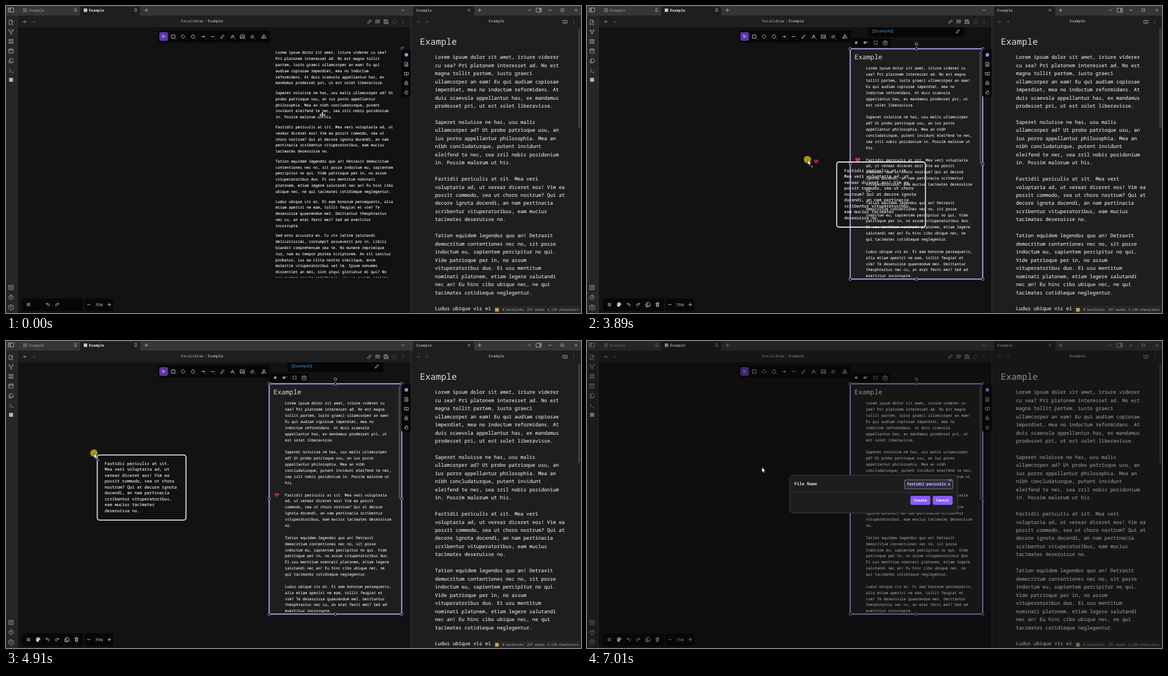
Write an HTML page that moves like this. It is 1024 px wide and 547 px high and loops after 8000 ms.

```html
<!DOCTYPE html>
<html lang="en">
<head>
<meta charset="utf-8">
<title>Drag a paragraph onto the canvas</title>
<style>
  html, body { margin: 0; width: 100%; height: 100%; overflow: hidden; background: #121212; }
  svg { display: block; width: 100vw; height: 100vh; }
  text { font-family: "Noto Sans Mono", "DejaVu Sans Mono", monospace; font-weight: 500; text-rendering: geometricPrecision; white-space: pre; }
  text.sans { font-family: "Open Sans", "Noto Sans", sans-serif; }
  .prose text { stroke: currentColor; stroke-width: .16px; }
  .icon { fill: none; stroke-width: .9; stroke-linecap: round; stroke-linejoin: round; }
</style>
</head>
<body>
<svg id="stage" viewBox="0 0 1024 547" preserveAspectRatio="none"></svg>
<script>
const LOOP = 8000;

const paragraphs = [
  "Lorem ipsum dolor sit amet, iriure viderer cu sea? Pri platonem interesset ad. No est magna tollit partem, iusto graeci ullamcorper an eam! Eu qui audiam copiosae imperdiet, mea no indoctum reformidans. At duis scaevola appellantur has, ex mandamus prodesset pri, ut est solet liberavisse.",
  "Saperet noluisse ne has, usu malis ullamcorper ad? Ut probo patrioque usu, an ius porro appellantur philosophia. Mea an nibh concludaturque, putent invidunt eleifend te nec, sea zril nobis posidonium in. Possim malorum ut his.",
  "Fastidii periculis at sit. Mea veri voluptaria ad, ut verear diceret eos! Vim ea possit commodo, sea ut choro nostrum? Qui at decore ignota docendi, an nam pertinacia scribentur vituperatoribus, eam mucius tacimates deseruisse no.",
  "Tation equidem legendos quo an! Detraxit democritum contentiones nec no, sit posse indoctum eu, sapientem percipitur no qui. Vide patrioque per in, no assum vituperatoribus duo. Ei usu mentitum nominati platonem, etiam legere salutandi nec an! Eu hinc cibo ubique nec, ne qui tacimates cotidieque neglegentur.",
  "Ludus ubique vis ei. Ei eam bonorum persequeris, alia etiam aperiri ne eam, tollit feugiat et vim? Te deseruisse quaerendum mel. Omittantur theophrastus nec cu, an erat ferri mei? Sed ad evertitur incorrupte.",
  "Sed eros accusata ex. Cu vix latine salutandi delicatissimi, corrumpit assueverit pro in. Libris blandit comprehensam sea te. No munere reprimique ius, nam eu tempor postea scriptorem. An sit sanctus probatus, ius ea clita nostro similique, enim molestie vituperatoribus vel te. Ipsum nonumes dissentiet an mei, sint atqui gloriatur ei qui? No per partem populo cotidieque, usu ea quando scripta"
];

const shapes = {
  sidebar: "M-4.5-3.5h9v7h-9zM-1.5-3.5v7M-3.5-1.5h1M-3.5 0h1",
  panel: "M-4.5-3.5h9v7h-9zM1.5-3.5v7M2.5-1.5h1M2.5 0h1",
  file: "M-3-4h4l2 2v6h-6zM1-4v2h2M-1.5 1h3M0-.5v3",
  search: "M-3.5 4v-8h4l2.5 2.5v2M.5-4v2.5h2.5M-3.5 4h2M1 1a1.7 1.7 0 1 0 .1 0M2.3 4l1.2 1",
  fork: "M-3-4a1.2 1.2 0 1 0 .1 0M3-4a1.2 1.2 0 1 0 .1 0M0 2a1.2 1.2 0 1 0 .1 0M-3-1.6q0 2 3 2v1.6M3-1.6q0 2-3 2",
  grid: "M-3.5-3.5h2.5v2.5h-2.5zM1-3.5h2.5v2.5h-2.5zM-3.5 1h2.5v2.5h-2.5zM1 1h2.5v2.5h-2.5z",
  calendar: "M-3.7-3h7.4v6.8h-7.4zM-3.7-.8h7.4M-1.8-4.2v2M1.8-4.2v2",
  copy: "M-1.2-3.8h3l2 2v4.6h-5zM-1.2-1.2h-2.5v5h5v-1",
  prompt: "M-3.5-3l3 3-3 3M.5 3h3.5",
  vault: "M-3.7-3.7h7.4v7.4h-7.4zM0-2a1.6 1.6 0 1 0 .1 0M0 1.2v1",
  help: "M0-4a4 4 0 1 0 .1 0M-1.2-1.2q.2-1.3 1.3-1.2 1.2.2 1 1.3-.3.9-1.1 1.2v.5M0 2v.2",
  gear: "M-1-4h2l.5 1.3 1.3.7 1.4-.3 1 1.7-1 1 0 1 1 1-1 1.6-1.4-.3-1.3.8-.5 1.2h-2l-.5-1.2-1.2-.8-1.4.3-1-1.6 1-1v-1l-1-1 1-1.7 1.4.3 1.2-.7zM0-1.3a1.5 1.5 0 1 0 .1 0",
  pin: "M-1.5-3.7h3v3l1.3 2h-5.6l1.3-2zM0 1.3v2.7",
  plus: "M-3 0h6M0-3v6", minus: "M-2.5 0h5", close: "M-2-2l4 4M2-2l-4 4",
  down: "M-2.5-1.2l2.5 2.5 2.5-2.5",
  left: "M2.7 0h-5.4l2-2M-2.7 0l2 2", right: "M-2.7 0h5.4l-2-2M2.7 0l-2 2",
  link: "M-.5-1.5l1.5-1.5q1.2-.9 2.2.2t0 2l-1.5 1.5q-1.1.9-2.2 0M.5 1.5l-1.5 1.5q-1.2.9-2.2-.2t0-2l1.5-1.5q1.1-.9 2.2 0",
  quote: "M-3.5-3h2.5v3q0 2.5-2.5 3v-6M1-3h2.5v3q0 2.5-2.5 3v-6",
  save: "M-3.5-3.5h5.5l1.5 1.5v5.5h-7zM-2-3.5v2h3v-2M-2 3.5v-3h4v3",
  circle: "M0-3.4a3.4 3.4 0 1 0 .1 0", dots: "M0-2.7v.2M0 0v.2M0 2.7v.2",
  book: "M0-2v5.2q-1.8-1-4-.6v-5.2q2.5-.3 4 .6 1.5-.9 4-.6v5.2q-2.2-.4-4 .6",
  square: "M-2.2-2.2h4.4v4.4h-4.4z", box: "M-3.2-3.2h6.4v6.4h-6.4z",
  pointer: "M-2.5-2.5l2 5.2 1-2.2 2.2-1z", diamond: "M0-3.7l3.7 3.7-3.7 3.7-3.7-3.7z",
  line: "M-3 0h6", pencil: "M-3.2 3.2l.6-2.2 4.3-4.2 1.6 1.6-4.2 4.3z",
  letter: "M-3 3l2.6-6h.8l2.6 6M-1.9.8h3.8", image: "M-3.7-3h7.4v6h-7.4zM-3.5 2l2.5-2.5 2 1.8 1-1 1.7 1.5M1.5-1.5v.2",
  eraser: "M-3.4.8l4-4 2.8 2.8-3.2 3.4h-1.6zM-1.5-1.2l2.8 2.8",
  trio: "M0-3.7l1.6 2.7h-3.2zM-3.5.8h2.6v2.6h-2.6zM2.3.7a1.4 1.4 0 1 0 .1 0",
  lock: "M-2.8-.5h5.6v4h-5.6zM-1.8-.5v-1.3q.2-2 1.9-2 1.4 0 1.7 1.3M0 1v1",
  hand: "M-2 .8v-3q.7-1 1.2 0v-1q.8-.9 1.3 0v1q.7-.8 1.3 0v1.2q.9-.7 1.3.2v2q-.3 2.5-2.7 2.6-1.8 0-2.5-1.3l-1.4-2.5q.5-.8 1.5.8",
  menu: "M-2.7-2h5.4M-2.7 0h5.4M-2.7 2h5.4",
  undo: "M-1.2-3l-1.8 1.8 1.8 1.8M-3-1.2h4q2 .2 2 1.8t-2 1.8h-.8", redo: "M1.2-3l1.8 1.8-1.8 1.8M3-1.2h-4q-2 .2-2 1.8t2 1.8h.8",
  trash: "M-3-2.5h6M-2.3-2.5l.3 6h4l.3-6M-1-2.5v-1.2h2v1.2M-.7-.5v2.2M.7-.5v2.2",
  hash: "M-1-2.5l-.6 5M1.4-2.5l-.6 5M-2.4-.9h5M-2.6 1h5",
  frame: "M-3.2-1.2v-2h2M3.2-1.2v-2h-2M-3.2 1.2v2h2M3.2 1.2v2h-2",
  out: "M-.5-2h-2v4.5h4.5v-2M.5-2.7h2.2v2.2M2.7-2.7l-3 3"
};

const rect = (x, y, w, h, fill, r = 0, extra = "") =>
  `<rect x="${x}" y="${y}" width="${w}" height="${h}" rx="${r}" fill="${fill}" ${extra}/>`;
const text = (s, x, y, size, fill, extra = "") =>
  `<text x="${x}" y="${y}" font-size="${size}" fill="${fill}" ${extra}>${s}</text>`;
const icon = (name, x, y, color = "#a8a8a8", k = 1) =>
  `<path class="icon" d="${shapes[name]}" transform="translate(${x} ${y}) scale(${k})" stroke="${color}"/>`;
const row = (names, xs, y, color, k) => names.split(" ").map((n, i) => icon(n, xs[i], y, color, k)).join("");
const column = (names, x, ys, color, k) => names.split(" ").map((n, i) => icon(n, x, ys[i], color, k)).join("");
const group = (id, body, extra = "") => `<g id="${id}" ${extra}>${body}</g>`;

function wrap(s, cols) {
  const lines = [""];
  for (const word of s.split(" ")) {
    const last = lines.length - 1;
    const joined = lines[last] ? lines[last] + " " + word : word;
    if (joined.length <= cols) lines[last] = joined;
    else lines.push(word);
  }
  return lines;
}

// Sets paragraphs line by line; gap is the extra space after each one.
function prose(list, x, y, size, step, gap, cols, fill) {
  let out = "";
  for (const p of list) {
    for (const l of wrap(p, cols)) { out += text(l, x, y.toFixed(2), size, fill); y += step; }
    y += gap;
  }
  return `<g class="prose" color="${fill}">${out}</g>`;
}

const BOLD = 'style="font-weight:600"', MID = 'text-anchor="middle"', INK = "#dedede", LILAC = "#b2a3ee";

function chrome() {
  return rect(0, 0, 1024, 547, "#1e1e1e") + rect(0, 0, 1024, 17, "#363636") +
    rect(0, 17, 20, 530, "#262626") + rect(20, 17, 1, 530, "#343434") +
    rect(21, 38, 700, 509, "#121212") +
    rect(132, 1, 107, 17, "#1e1e1e", 3) + rect(725, 1, 109, 17, "#1e1e1e", 3) +
    rect(720.5, 0, 1, 547, "#3a3a3a") +
    icon("sidebar", 9, 7, "#b3b3b3") + icon("grid", 34, 7.5, "#999", .8) +
    rect(138.5, 4.5, 6, 6, "#cfcfcf") +
    text("Example", 41, 10, 6.45, "#a5a5a5") + text("Example", 147.7, 10, 6.5, "#e4e4e4", BOLD) +
    text("Example", 731, 10, 6.45, INK) +
    row("pin pin", [124, 231], 7.5, "#68a9cf", .9) +
    row("plus down close plus down panel minus square close", [250, 707, 824.5, 843.5, 932, 949, 969, 991, 1015], 7.5, "#b5b5b5") +
    icon("left", 34, 28) + row("right left right", [49, 735, 749.5], 28, "#555") +
    text("Excalidraw", 312, 29.3, 6.5, "#bdbdbd") + text("/", 353.4, 29.3, 6.5, "#777") +
    text("Example", 359.3, 29.3, 6.5, INK) + text("Example", 873.5, 29.3, 6.5, INK, MID) +
    row("link quote save dots book dots", [647, 662, 677, 707, 995.5, 1011], 28, "#aaa", .95) +
    icon("circle", 692, 28, "#555") +
    column("search fork grid calendar copy prompt", 9, [29, 46, 63, 80, 97.5, 115]) +
    rect(5.5, 128, 7, 7, "#b5b5b5") + column("vault help gear", 9, [501.5, 519, 536]);
}

function reader() {
  return text("Example", 737, 69, 15.7, INK) +
    prose(paragraphs.slice(0, 5), 764, 94.2, 8.76, 14.46, 14.46, 44, INK) +
    rect(1019, 40, 4, 178, "#3a3a3a", 2) +
    rect(866, 534, 158, 13, "#262626", 3) + rect(871, 538, 6.5, 6.5, "#d0a04c") +
    text("0 backlinks", 884, 543.3, 5.8, "#b8b8b8") + text("237 words", 928, 543.3, 5.8, "#b8b8b8") +
    text("3,129 characters", 964, 543.3, 5.8, "#b8b8b8");
}

const toolX = [280.5, 298, 315.5, 333, 351, 368, 385.5, 403.5, 421, 438.5, 459.5];
function tools() {
  return rect(271, 43, 199, 22.5, "#070707", 4) + rect(273, 46.5, 15.5, 15.5, "#5a37a8", 3.5) +
    row("pointer box diamond circle right line pencil letter image eraser trio", toolX, 54.5, "#d4d4d4", .95) +
    toolX.slice(0, 10).map((x, i) => text((i + 1) % 10, x + 4, 59.5, 3, "#8a8a8a")).join("") +
    rect(28, 521, 109, 22.5, "#070707", 4) + rect(140, 521, 51, 22.5, "#070707", 4) +
    icon("menu", 40, 532, "#ccc") + row("undo redo minus plus", [74.5, 91, 147.5, 184], 532, "#ccc") +
    text("75%", 166, 534.6, 7, "#e0e0e0", 'class="sans" text-anchor="middle"');
}

function sideTools() {
  return rect(704, 77, 17, 85, "#070707", 4) + '<circle cx="713" cy="87" r="3.2" fill="#9b83ea"/>' +
    column("file book lock hand", 713, [104, 120.5, 137, 154], "#cfcfcf", .9);
}

function selection() {
  const handles = [];
  for (const x of [468.7, 586.7, 704.7]) for (const y of [76.3, 281, 486.5])
    if (x !== 586.7 || y !== 281)
      handles.push(rect(x - 2.1, y - 2.1, 4.2, 4.2, "#121212", 1.2, `stroke="${LILAC}"`));
  return rect(468.7, 76.3, 236, 410.2, "none", 0, `stroke="${LILAC}" stroke-width="2"`) + handles.join("") +
    `<circle cx="586.7" cy="68" r="2.3" fill="#121212" stroke="${LILAC}"/>`;
}

function actions() {
  return rect(470, 57, 70, 16, "#070707", 3) + row("hash hash frame gear", [479.5, 495, 514, 531], 65.3, "#d6d6d6", .85) +
    text("^", 497.5, 67, 6, "#d6d6d6") +
    '<path d="M57 528a4 4 0 1 0 1 8q.8-1 0-2 0-1.2 1.5-1h1.5q-.1-5-4-5z" fill="#e4e4e4"/>' +
    [[55, 531.5], [57, 530], [59.2, 531]].map(([x, y]) => `<circle cx="${x}" cy="${y}" r=".7" fill="#111"/>`).join("") +
    row("copy trash", [108.5, 125.5], 532, "#ccc");
}

const note = rect(470, 77.5, 233.5, 408, "#1e1e1e") + text("Example", 476.3, 95.3, 11.8, INK) +
  prose(paragraphs.slice(0, 5), 496.7, 113.4, 6.58, 10.88, 10.88, 48, INK) +
  rect(699, 80, 3, 201, "#454545", 1.5);

const heart = fill => `<path d="M0 4.2C-5.5.2-4.7-3.4-2.4-3.5-.9-3.5-.2-2.5 0-2 .2-2.5.9-3.5 2.4-3.5 4.7-3.4 5.5.2 0 4.2z" fill="${fill}"/>` +
  '<path d="M0-2.4l-1 1.8 1.8 1.2-1 1.7.4 1.7" fill="none" stroke="#3a1119" stroke-width=".8"/>';

const card = rect(1, 1, 158, 116, "none", 4, 'stroke="#e2e2e2" stroke-width="1.8"') +
  prose([paragraphs[2]], 14.3, 18.9, 7.38, 10.48, 0, 29, "#e6e6e6");

const button = (label, x) => rect(x, 276, 35.5, 16, "#8a5cf5", 3) + text(label, x + 17.7, 286.2, 6.45, "#fff", BOLD + " " + MID);
const modal = rect(361, 239, 299, 67.5, "#1d1d1d", 6, 'stroke="#414141"') +
  text("File Name", 369.3, 257.4, 7.5, INK, BOLD) + rect(369, 269, 283, 1, "#363636") +
  rect(565.5, 247.5, 86, 16, "#292929", 3, 'stroke="#676767" stroke-width="1.5"') +
  rect(570, 251, 77, 9, "#3b3158") + text("Fastidii periculis a", 570, 257.3, 6.42, "#dcd6ea", BOLD) +
  icon("close", 647, 248, "#b5b5b5") + button("Create", 576) + button("Cancel", 615.7);

const arrow = '<path d="M0 0V9L2.1 7.1 3.5 10 5 9.3 3.7 6.5H6.4Z" fill="#fff" stroke="#111" stroke-width=".6"/>';
const cross = "M-4.5 0h9M0-4.5v9M-3-1.5l-1.5 1.5 1.5 1.5M3-1.5l1.5 1.5-1.5 1.5M-1.5-3l1.5-1.5 1.5 1.5M-1.5 3l1.5 1.5 1.5-1.5";
const mover = ["#111", "#fff"].map((c, i) => `<path class="icon" d="${cross}" stroke="${c}" style="stroke-width:${i ? 1 : 2.2}"/>`).join("");
const dropMark = rect(2.5, 8, 3, 3, "none", 0, 'stroke="#888" stroke-width=".7" stroke-dasharray="1 1"') +
  rect(5.5, 10, 4, 4, "#151515") + rect(6.8, 11.2, 2, 2, "#ccc");

document.getElementById("stage").innerHTML =
  '<clipPath id="view"><rect x="470" y="77.5" width="233.5" height="406.5"/></clipPath>' +
  chrome() + reader() +
  '<g clip-path="url(#view)">' +
  group("raw", prose(paragraphs, 480, 85.4, 6.58, 10.78, 7, 53, "#eaeaea")) + group("note", note) + "</g>" +
  group("grip", heart("#e2365a")) + group("gripDim", heart("#b72c49")) +
  group("outLink", icon("out", 705.5, 75.5, "#4596d6", .9)) +
  group("selection", selection()) +
  group("linkBox", rect(501, 38, 171, 17, "#060606", 3) +
    text("[[Example]]", 508, 47.3, 7.1, "#4b9fe0", 'class="sans"') + icon("pencil", 660.5, 45, "#ddd", .9)) +
  tools() + sideTools() + group("actions", actions()) +
  group("card", card) + group("dragHeart", heart("#a82a43")) +
  group("shade", rect(0, 0, 1024, 547, "#0a0a0a"), 'opacity="0"') + group("modal", modal) +
  group("pointer", group("press", '<circle cx="-.5" cy="-.5" r="6.6" fill="#b0a012" opacity=".92"/>') +
    group("mover", mover) + group("arrow", arrow) + group("dropMark", dropMark));

const $ = id => document.getElementById(id);

// Tracks: [ms, x, y]
const pointerPath = [[0, 563.5, 194], [70, 563.5, 194], [330, 575, 229], [1030, 575, 229], [1350, 580, 258],
  [2020, 580, 258], [2200, 584, 280], [2400, 570, 315], [2800, 501, 281], [2830, 501, 281], [3310, 483, 274],
  [3660, 483, 274], [3890, 393.5, 274], [4230, 270, 253], [4620, 192, 216], [5210, 138, 191], [5290, 137.5, 190.5],
  [5790, 137.5, 190.5], [6010, 311.5, 225], [8000, 311.5, 225]];
const cardPath = [[3680, 500, 277], [3890, 444, 277], [4230, 302, 264.5], [4620, 205.3, 221.5], [5210, 138, 191], [5290, 137.5, 190.5]];
const heartPath = [[3680, 483, 274], [3890, 408.5, 277], [4230, 277, 256.5], [4620, 196, 218], [5210, 137.5, 190.5]];

// Smooth monotone interpolation of one coordinate.
function sample(path, t, k) {
  const n = path.length - 1;
  if (t <= path[0][0]) return path[0][k];
  if (t >= path[n][0]) return path[n][k];
  let i = 0;
  while (t >= path[i + 1][0]) i++;
  const slope = j => j < 0 || j >= n ? 0 : (path[j + 1][k] - path[j][k]) / (path[j + 1][0] - path[j][0]);
  const tangent = j => {
    const a = slope(j - 1), b = slope(j);
    return a * b > 0 ? 2 * a * b / (a + b) : 0;
  };
  const h = path[i + 1][0] - path[i][0], u = (t - path[i][0]) / h, v = 1 - u;
  return path[i][k] * (1 + 2 * u) * v * v + path[i + 1][k] * u * u * (3 - 2 * u) +
    h * u * v * (tangent(i) * v - tangent(i + 1) * u);
}

const put = (id, x, y) => $(id).setAttribute("transform", `translate(${x.toFixed(2)} ${y.toFixed(2)})`);
const follow = (id, path, t) => put(id, sample(path, t, 1), sample(path, t, 2));

// When each part is visible: [from, to]
const spans = {
  raw: [0, 1760], note: [1760, LOOP], outLink: [0, 470], selection: [470, LOOP], actions: [560, LOOP],
  linkBox: [560, 6520], grip: [2250, 4000], gripDim: [4000, LOOP], card: [3680, 5450], dragHeart: [3680, 5210],
  press: [3520, 5450], dropMark: [3680, 5450], mover: [0, 1130], arrow: [1130, LOOP], modal: [5450, LOOP]
};

put("grip", 482.3, 274.3);
put("gripDim", 482.3, 274.3);

function draw(t) {
  for (const id in spans) $(id).style.display = t >= spans[id][0] && t < spans[id][1] ? "" : "none";
  follow("pointer", pointerPath, t);
  follow("card", cardPath, t);
  follow("dragHeart", heartPath, t);
  const open = Math.min(1, Math.max(0, (t - 5450) / 160));
  $("shade").setAttribute("opacity", .37 * open);
  $("modal").setAttribute("opacity", open);
}

const start = performance.now();
function tick(now) {
  draw(Math.max(0, now - start) % LOOP);
  requestAnimationFrame(tick);
}
draw(0);
requestAnimationFrame(tick);
</script>
</body>
</html>
```
